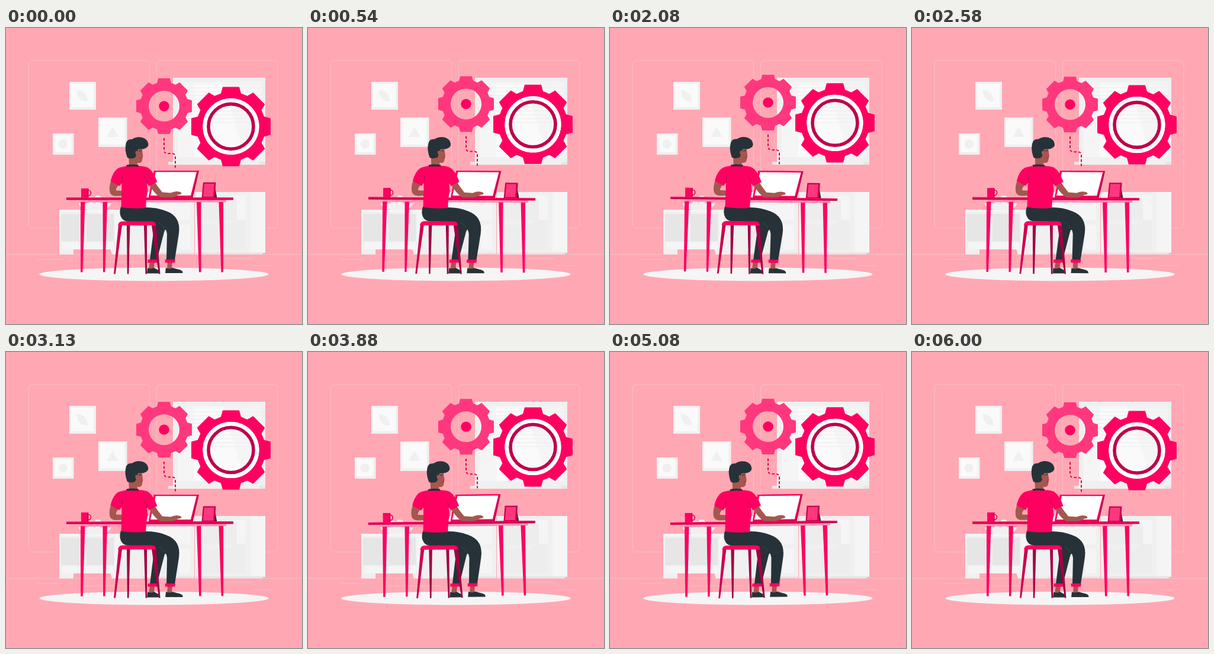
These frames come from a looping animation (500 px wide and 500 px high, 6040 ms). An HTML page:

```html
<!DOCTYPE html>
<html lang="en">
<head>
<meta charset="utf-8">
<title>Desk and gears</title>
<style>
html, body { margin: 0; width: 100%; height: 100%; overflow: hidden; background: #ffa8b4 }
svg { display: block; width: 100vw; height: 100vh }
.g0 { fill: #fafafa } .g1 { fill: #f5f5f5 } .g2 { fill: #f0f0f0 } .g3 { fill: #e6e6e6 }
.pink { fill: #ff0060 } .rose { fill: #ff387d } .dark { fill: #cc004f } .wine { fill: #a30043 }
.ink { fill: #263238 } .skin { fill: #a5574f }
</style>
</head>
<body>
<svg viewBox="0 0 500 500">
  <rect width="500" height="500" fill="#ffa8b4"/>

  <!-- wall and floor lines -->
  <g fill="none" stroke="#ebebeb" stroke-width=".35">
    <rect x="38.2" y="55" width="204.5" height="282.8" rx="5.7"/>
    <rect x="254.4" y="55" width="204.5" height="282.8" rx="5.7"/>
    <path d="M0 382.4H500M416.8 401.3h34M322.5 401.2h8.7M366 389.2h49.8M52.5 390.9h43M104.6 390.9h6.3M131.5 395.1h93.7"/>
  </g>

  <!-- window -->
  <path class="g3" d="M282 84H438V231H282z"/>
  <path class="g2" d="M282 84H438V226H274V231H434V226H282z"/>
  <path class="g1" d="M290 92H432V218H290z"/>
  <path class="g0" d="M318 92H366L404 218H318z"/>
  <path class="g2" d="M282 218H438V226H282z"/>
  <path class="g3" d="M274 226H282V231H274zM428 226H438V231H428z"/>
  <path d="M288 94.5H432M288 101H432M288 107.500H432M288 114H432M288 120.500H432M288 127H432M288 133.500H432M288 140H432M288 146.500H432M288 153H432M288 159.500H432" stroke="#f0f0f0" stroke-width="1.3"/>

  <!-- pictures -->
  <g id="frames"></g>
  <path class="g2" d="M119.500 105Q135 104 138.500 123.500Q121 126 119.500 105zM170 184L180 167L190 184z"/>
  <circle class="g2" cx="96.2" cy="196" r="7.7"/>

  <!-- left cabinet -->
  <path class="g2" d="M90 307H232V373H90zM90 373H114V382.500H90zM176 373H232V382.500H179z"/>
  <path class="g3" d="M93 314H133V360H93zM136 314H182V360H136z"/>
  <path class="g1" d="M90 307H190V311H90zM95 362H182V374H95zM184 311H192V382H184z"/>
  <path class="g2" d="M122 296H178Q173 307 160 307H140Q127 307 122 296z"/>
  <circle class="g2" cx="155" cy="290" r="7"/><circle class="g2" cx="144" cy="291" r="6"/>

  <!-- right cabinet -->
  <path class="g2" d="M229 277H318V380H229zM319 277H438V380H319z"/>
  <path class="g1" d="M413.500 277H438V378H413.500zM331 283H405V325H331zM331 332H405V374H331zM237 283H311V325H237zM237 332H311V374H237z"/>
  <path fill="#ededed" d="M331 283H376L390 291V325H331zM331 332H376L390 324H405V374H331zM237 332H292V374H237z"/>
  <path class="g3" d="M319 379H434V382.500H319zM229 379H318V382H229z"/>

  <ellipse cx="250" cy="416" rx="193.700" ry="11.300" class="g1"/>

  <g id="float">
    <path d="M267 186V206q0 6 6 6H280q6 0 6 6V236" fill="none" stroke="#e0004f" stroke-width="2" stroke-dasharray="4.500 3"/>
    <path id="small" class="rose" fill-rule="evenodd"/>
    <circle class="pink" cx="267" cy="132" r="8.700"/>
    <path id="big" class="pink" fill-rule="evenodd"/>
    <circle cx="380" cy="166.400" r="44.500" fill="none" stroke="#fff" stroke-width="6"/>
    <circle cx="380" cy="166.400" r="38" fill="none" stroke="#c0004b" stroke-width="5.600"/>
  </g>

  <g id="desk">
    <!-- laptop -->
    <path class="dark" d="M250 241H326L315.500 287H241z"/>
    <path class="pink" d="M250 241H323L313 285H241z"/>
    <path fill="#fff" d="M253 243.300H322L312 283H244z"/>

    <!-- tablet and mug -->
    <path class="ink" d="M352 263L356.500 287H348z"/>
    <path class="dark" d="M333 260.700H354.500L353 287H330.500z"/>
    <path class="rose" d="M335 263H351.500L350 285H333z"/>
    <path class="dark" d="M127 271H139.500V286.500H127z"/>
    <path class="pink" d="M127 271H137.500V286.500H127z"/>
    <path d="M139 274.300a4.300 4.300 0 0 1 0 9" fill="none" stroke="#e0004f" stroke-width="1.600"/>

    <!-- table -->
    <path fill="#ff8fb3" d="M126 290H372V294.500H126z"/>
    <path class="pink" d="M126 294H133.500L129.500 412.500H126zM163.500 294H171L167.300 412.500H164zM322 294H329.500V412.500H326zM359.500 294H367V412.500H363.500z"/>
    <path class="dark" d="M102 286.500H384V290.600H102z"/>
    <path class="pink" d="M102 286.500H384V288H102z"/>

    <!-- legs and shoes -->
    <path class="skin" d="M243 394H251L250 407H241zM273 394H281L280 407H272z"/>
    <path class="ink" d="M239 405Q244 408 250 405L259 410Q261 414 257 414.500H238zM270 405Q276 408 281 405L294 408.500Q299 410 298.500 414H269z"/>
    <path class="ink" d="M194 302Q190 314 196 322Q200 327 209 327H240Q251 330 249 345L243 392H255L267 345Q270 335 272 348L271 392H285L292 347Q296 318 270 309Q255 303 236 303z"/>
    <path d="M267 338Q266 333 258 329" fill="none" stroke="#455a64" stroke-width=".6"/>
    <path class="pink" d="M239.500 391H256L255 396.500H239zM268.500 391H286L285 396.500H269z"/>

    <!-- stool -->
    <path class="dark" d="M190 333H196L184.800 415.500H182z"/>
    <path class="wine" d="M204 333H209.500L207.300 415.500H204.800zM233 333H238L238 415.500H235.500zM246 333H253.500L260.500 415.500H258z"/>
    <path class="pink" d="M189 333.500Q190 326.500 197 326.500H246Q253 326.500 253.500 333.500z"/>

    <!-- head -->
    <path class="skin" d="M207 212L208 233Q216 238 222 232V227.500Q230 230 230.500 220L231.500 216L229.500 203H214z"/>
    <path d="M227 219.500Q229.500 220 230 217.500" fill="none" stroke="#7d3733" stroke-width="1"/>
    <path class="ink" d="M205 219Q200 206 202.500 196Q204 187 213 188Q220 183 229 184.700Q239 187 240.500 196Q241 202 232 204.500H223L222 208Q218 206 218.500 212L220 215L218 219Q210 222 205 219z"/>
    <path d="M224 208l5-1" stroke="#263238" stroke-width="1"/>

    <!-- arms and shirt -->
    <path class="skin" d="M178 257Q173 269 175.500 278Q178 284 186 283.800L197 283.500V275L186 274.500Q185 270 192 264zM241 264L250 258Q256 268 264 277.500L278 278.500Q288 274 295.500 277.500L296.500 280.500L290 282Q285 286.500 277 286L260 286Q251 280 241 264z"/>
    <path class="pink" d="M191 236Q202 233 207 233H222Q234 233 240 236Q249 242 255.500 260L241.500 267L238 262L239.500 275Q236 290 236.500 304Q215 306 194.500 303L195.500 262L191.500 267L176.500 259Q181 241 191 236z"/>
    <path class="ink" d="M203.500 234.200V231.500Q213 229.500 224 231.500V234.200Q213 233.500 203.500 234.200z"/>
    <path d="M195.500 262L196.500 250M238.500 263Q237 256 233 251" fill="none" stroke="#b5004a" stroke-width=".8"/>
  </g>
</svg>
<script>
const $ = id => document.getElementById(id);

for (const [x, y, w, h] of [[107, 91, 45, 47], [156, 151, 48.5, 50], [79, 178, 35.500, 36]])
  $('frames').innerHTML += `<path class="g2" d="M${x} ${y}h${w}v${h}h${-w}z"/>
    <path class="g0" d="M${x + 3} ${y + 3}h${w - 7}v${h - 7}h${7 - w}z"/>`;

// Eight-toothed gear with a round hole
function gear(id, cx, cy, r, hole) {
  const tooth = [[-17, -56], [-14, -67], [14, -67], [17, -56]];
  const points = [];
  for (let i = 0; i < 8; i++) {
    const c = Math.cos(i * Math.PI / 4), s = Math.sin(i * Math.PI / 4), k = r / 67;
    for (const [x, y] of tooth)
      points.push([cx + k * (x * c - y * s), cy + k * (x * s + y * c)]);
  }
  $(id).setAttribute('d', `M${points.join('L')}zM${cx - hole} ${cy}` +
    `a${hole} ${hole} 0 1 0 ${2 * hole} 0a${hole} ${hole} 0 1 0 ${-2 * hole} 0z`);
}
gear('small', 267, 132, 47, 26);
gear('big', 380, 166.4, 67, 47.5);

const LOOP = 6040, FPS = 24;

function draw(now) {
  // Motion is stepped at 24 pictures per second
  const t = Math.floor(now % LOOP * FPS / 1000 + .2) / FPS;
  const lift = 10 * (1 - Math.abs(1 - t % 3 / 1.5));
  const p = (t + 1.5) % 6;
  const tilt = Math.abs(p - 3) < 3 ? 1 - Math.abs(p - 3) / 1.5 : -1;
  $('float').setAttribute('transform', `translate(0 ${-lift})`);
  $('desk').setAttribute('transform', `rotate(${tilt} 243 300)`);
  requestAnimationFrame(draw);
}
draw(performance.now());
</script>
</body>
</html>
```
